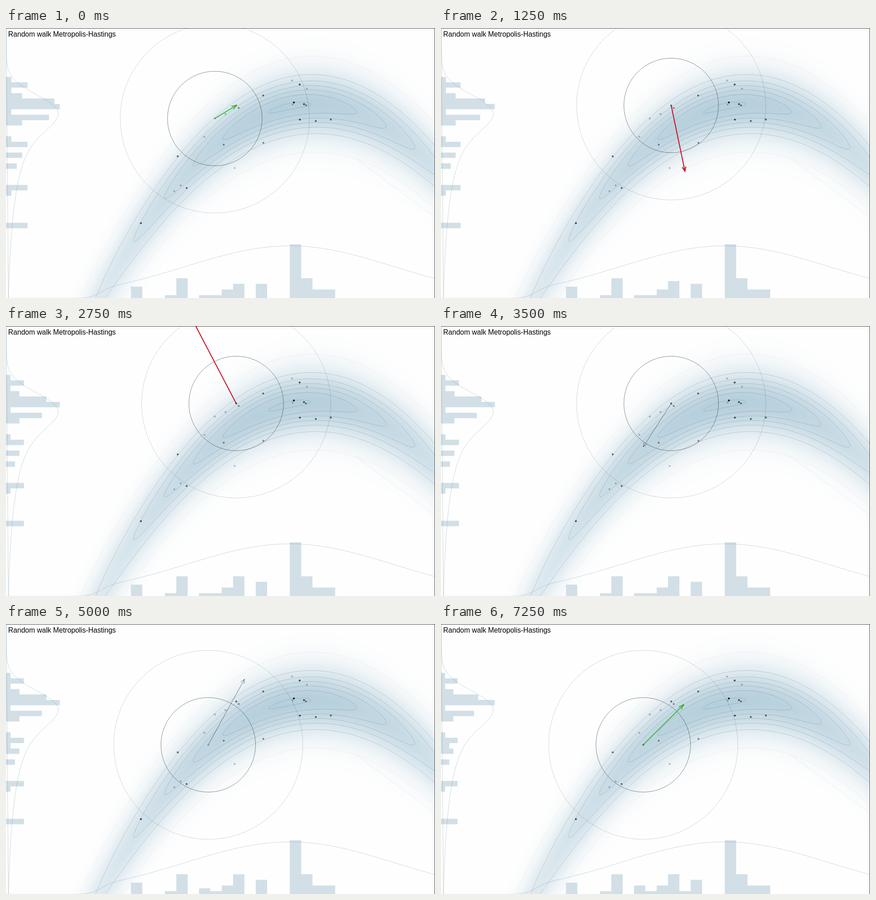
Animation, 943 px wide and 594 px high, one loop 8 s. Source, as an HTML page with a canvas:

```html
<!DOCTYPE html>
<html lang="en">
<head>
<meta charset="utf-8">
<title>Random walk Metropolis-Hastings</title>
<style>
  html, body { margin: 0; width: 100%; height: 100%; overflow: hidden; background: #fefefe; }
  canvas { display: block; }
  p { position: absolute; left: 4.8px; top: 5px; margin: 0; color: #000; white-space: nowrap;
      font: 15.6px/18px "Liberation Sans", Arial, sans-serif; }
</style>
</head>
<body>
<canvas id="stage" width="943" height="594"></canvas>
<p>Random walk Metropolis-Hastings</p>
<script>
const W = 943, H = 594, LOOP = 8000;
const SCALE = 104, OX = 623.6, OY = 297.3;   // pixels per unit, place of (0, 0)
const RHO = 0.8, SIGMA = 0.6;
const BIN_X = 24.94, BIN_Y = 11.89, PEAK = 118.3;

// Chain so far: x, y, number of samples there
const past = [
  [629, 115.5, 1], [645.5, 124.3, 4], [661.5, 133.5, 1], [565.3, 148.5, 3], [632.8, 163.8, 9],
  [630, 168.3, 1], [655, 167.5, 4], [659.3, 170.2, 2], [511.5, 176, 2], [482.5, 189.4, 1],
  [459, 199.2, 1], [646, 201.6, 4], [714, 201.4, 3], [681, 204.6, 3], [436, 239.5, 1],
  [565.7, 252.7, 2], [478.6, 256.8, 2], [377.5, 282.4, 3], [502.5, 308, 1],
  [384, 346.3, 1], [397, 352, 3], [370, 359, 1], [296.5, 429.3, 4]
];
const start = [502.5, 308, 1];               // counted, but has no dot of its own

const A = [459, 199.2], B = [506, 170.4], C = [444.6, 265.8], D = [532.6, 178.3];
// Proposals: when shown, when decided, from, to, accepted
const steps = [
  [-1000, 0, A, B, true],
  [500, 1250, B, [536.2, 315], false],
  [2000, 2750, B, [406, -21], false],
  [3500, 4250, B, C, true],
  [5000, 5750, C, [524.3, 121.3], false],
  [6500, 7250, C, D, true]
];

const ctx = document.getElementById("stage").getContext("2d");

// Squared distance of a point (in units) from the mode of the warped normal
function dist2(x, y) {
  const u = x / 2, e = (2 * y + 0.4 * x * x - 2.4 - RHO * u) / SIGMA;
  return u * u + e * e;
}

function line(c, points, color, width = 1, close = false) {
  c.beginPath();
  for (const [x, y] of points) c.lineTo(x, y);
  if (close) c.closePath();
  c.strokeStyle = color;
  c.lineWidth = width;
  c.stroke();
}

function contour(c, level, color) {
  const r = Math.sqrt(level), points = [];
  for (let i = 0; i < 400; i++) {
    const t = i * Math.PI / 200, u = r * Math.cos(t), x = 2 * u;
    const v = RHO * u + SIGMA * r * Math.sin(t);
    points.push([OX + SCALE * x, OY - SCALE * (v + 2.4 - 0.4 * x * x) / 2]);
  }
  line(c, points, color, 1, true);
}

function layer(draw) {
  const canvas = document.createElement("canvas");
  canvas.width = W;
  canvas.height = H;
  draw(canvas.getContext("2d"));
  return canvas;
}

const shade = layer(c => {
  const img = c.createImageData(W, H);
  for (let py = 0, i = 0; py < H; py++) {
    for (let px = 0; px < W; px++, i += 4) {
      const k = Math.exp(-0.2 * dist2((px - OX) / SCALE, (OY - py) / SCALE));
      img.data.set([254 - 72 * k, 254 - 47 * k, 254 - 34 * k, 255], i);
    }
  }
  c.putImageData(img, 0, 0);
});

const lines = layer(c => {
  for (const level of [0.05, 0.5, 1.04, 1.75, 2.72, 4.4]) contour(c, level, "rgba(70,110,130,.27)");
  contour(c, 11.5, "rgba(110,150,160,.09)");
  line(c, [[770, 288], [943, 416]], "rgba(110,150,160,.14)");

  // Marginal densities, summed over the visible height
  const alongX = new Array(314).fill(0), alongY = new Array(199).fill(0);
  for (let i = 0; i < 416; i++) {
    for (let j = 0; j < 199; j++) {
      const p = Math.exp(-0.415 * dist2((i * 3 - OX) / SCALE, (OY - j * 3) / SCALE));
      if (i < 316) alongX[i] = (alongX[i] || 0) + p;
      alongY[j] += p;
    }
  }
  const topX = Math.max(...alongX), topY = Math.max(...alongY);
  const color = "rgba(90,130,140,.3)";
  line(c, alongX.map((p, i) => [i * 3, 594.3 - 115 * p / topX]), color);
  line(c, alongY.map((p, j) => [0.5 + 114.3 * p / topY, j * 3]), color, 1, true);

  c.fillStyle = "#444";
  c.fillRect(0, 0, W, 1);
  c.fillRect(W - 1, 0, 1, H);
});

function histogram(samples, axis, offset, size, bar) {
  const counts = [];
  for (const s of samples) {
    const k = Math.floor((s[axis] - offset) / size);
    counts[k] = (counts[k] || 0) + s[2];
  }
  const unit = PEAK / Math.max(...counts.filter(Boolean));
  ctx.beginPath();
  counts.forEach((n, k) => bar(offset + k * size, n * unit));
  ctx.fillStyle = "#d2dfe6";
  ctx.fill();
}

function circle([x, y], r) {
  ctx.beginPath();
  ctx.arc(x, y, r, 0, 2 * Math.PI);
}

function ring(center, r, color) {
  circle(center, r);
  ctx.strokeStyle = color;
  ctx.lineWidth = 1;
  ctx.stroke();
}

function arrow(from, to, color, width) {
  const a = Math.atan2(to[1] - from[1], to[0] - from[0]);
  const barb = d => [to[0] - 10.5 * Math.cos(a + d), to[1] - 10.5 * Math.sin(a + d)];
  line(ctx, [from, to], color, width);
  line(ctx, [barb(0.4), to, barb(-0.4)], color, width);
}

function draw(t) {
  const samples = past.map(s => [...s]);
  let step;
  for (const s of steps) {
    if (t >= s[0]) step = s;
    if (t < s[1]) continue;
    const at = s[4] ? s[3] : s[2];
    const same = samples.find(p => p[0] === at[0] && p[1] === at[1]);
    if (same) same[2]++;
    else samples.push([...at, 1]);
  }
  const [, decided, from, to, accepted] = step;

  ctx.drawImage(shade, 0, 0);
  const all = [...samples, start];
  histogram(all, 0, 0.3, BIN_X, (x, h) => ctx.rect(x, H - h, BIN_X, h));
  histogram(all, 1, 0.5, BIN_Y, (y, w) => ctx.rect(0, y, w, BIN_Y));
  ctx.drawImage(lines, 0, 0);

  ring(from, SCALE, "rgba(20,30,35,.5)");
  ring(from, 2 * SCALE, "rgba(20,30,35,.18)");
  if (t < decided) arrow(from, to, "rgba(20,35,45,.6)", 1);
  else arrow(from, to, accepted ? "#3cbe3c" : "#c40a1c", 2);

  for (const [x, y, n] of samples) {
    circle([x, y], 2.1);
    ctx.fillStyle = `rgba(0,0,0,${1 - 0.75 ** n})`;
    ctx.fill();
  }
}

function tick() {
  draw(performance.now() % LOOP);
  requestAnimationFrame(tick);
}
tick();
</script>
</body>
</html>
```
